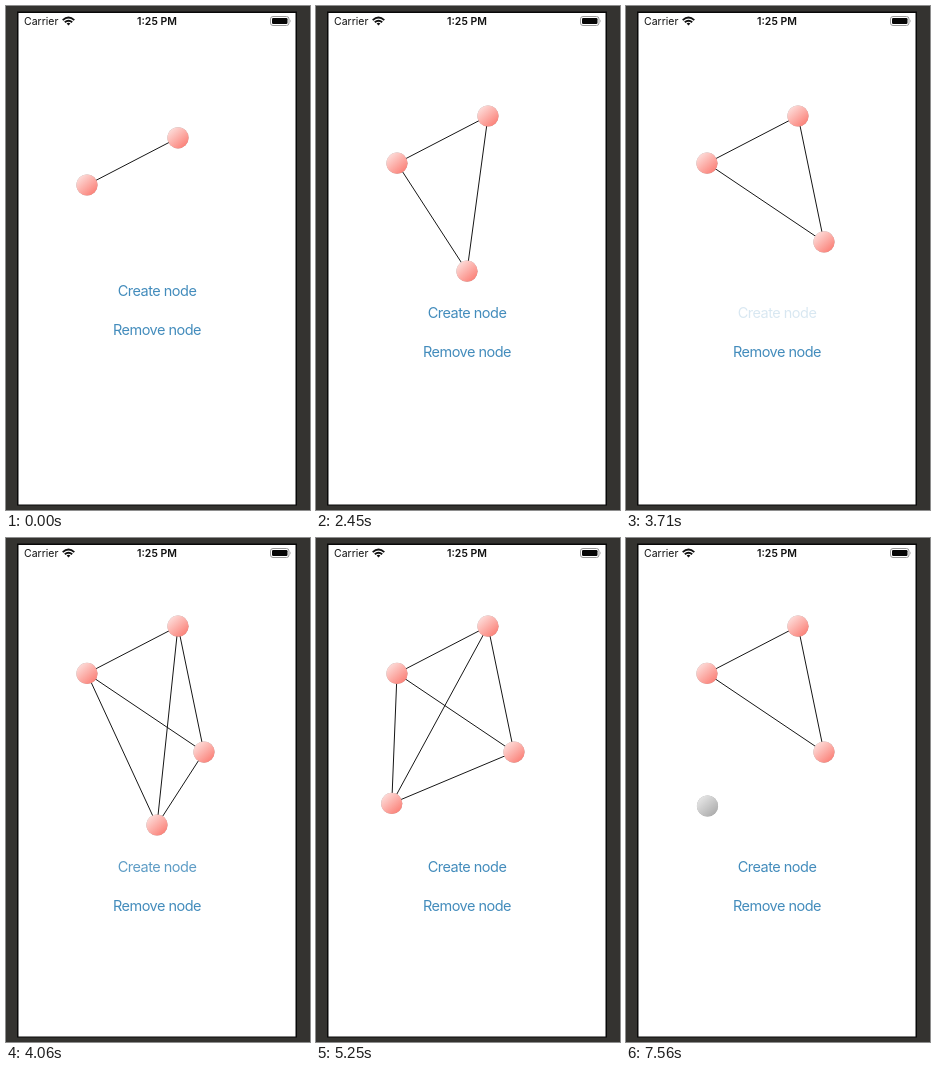
Write an HTML page that moves like this. It is 304 by 504 pixels and loops after 8 s.

```html
<!DOCTYPE html>
<html lang="en">
<head>
<meta charset="utf-8">
<title>Node graph</title>
<style>
  html, body { margin: 0; width: 100%; height: 100%; overflow: hidden; background: #343330; }
  svg { display: block; width: 100%; height: 100%; }
  text { font: 10.5px Inter, sans-serif; fill: #111; }
  .time { font-weight: 600; text-anchor: middle; }
  .button { font-size: 14.5px; letter-spacing: -.035em; fill: #438cbc; text-anchor: middle; }
  line { stroke: #161616; stroke-width: 1; }
  .node { filter: drop-shadow(.5px .8px .7px #0005); }
</style>
</head>
<body>
<svg viewBox="0 0 304 504">
  <defs>
    <linearGradient id="pink" x1=".15" y1=".1" x2=".85" y2=".9">
      <stop stop-color="#fddcd9"/><stop offset="1" stop-color="#fb8077"/>
    </linearGradient>
    <linearGradient id="gray" x1=".15" y1=".1" x2=".85" y2=".9">
      <stop stop-color="#e6e6e6"/><stop offset="1" stop-color="#acacac"/>
    </linearGradient>
  </defs>
  <rect width="304" height="504" fill="#343330"/>
  <rect x="11" y="5.5" width="280" height="494" fill="#080808"/>
  <rect x="12.5" y="7" width="277" height="491.5" fill="#fff"/>
  <text x="18" y="19">Carrier</text>
  <g fill="none" stroke="#111" stroke-width="1.9">
    <path d="M56.7 14.1Q62.5 8.9 68.3 14.1M58.8 16.3Q62.5 13 66.2 16.3"/>
    <path d="M60.6 17.4Q62.5 16 64.4 17.4L62.5 19.5Z" fill="#111" stroke="none"/>
  </g>
  <text class="time" x="151" y="19">1:25 PM</text>
  <rect x="264.5" y="10.5" width="18.5" height="9" rx="2.5" fill="#fff" stroke="#999"/>
  <rect x="266" y="12" width="15.5" height="6" rx="1.2" fill="#050505"/>
  <path d="M284.2 13.5q1.4 1.5 0 3z" fill="#999"/>
  <g id="edges"></g>
  <g id="nodes"></g>
  <g id="buttons">
    <text id="create" class="button" x="151" y="290">Create node</text>
    <text class="button" x="151" y="329.3">Remove node</text>
  </g>
</svg>
<script>
const LOOP = 8000;
const DIM = 0.2, FADE = 490;
const PRESSES = [{ down: 1680, up: 1750 }, { down: 3710, up: 3780 }];
const DESELECT = 7000;
const ROW = 21.8;

// Each track lists [time, x, y] in content coordinates; the content moves up when a node is added.
const TRACKS = [
  [[0, 81, 179]],
  [[0, 172, 131.8]],
  [[PRESSES[0].up, 151, 287], [2830, 151, 287], [3430, 198, 257.7]],
  [[PRESSES[1].up, 151, 330.6], [4790, 151, 330.6], [5230, 75.7, 309], [5600, 81.5, 311.6]]
];

const byId = id => document.getElementById(id);
const add = (parent, tag, attrs = {}) => {
  const el = document.createElementNS('http://www.w3.org/2000/svg', tag);
  setAttrs(el, attrs);
  return parent.appendChild(el);
};
function setAttrs(el, attrs) {
  for (const key in attrs) el.setAttribute(key, attrs[key]);
}
const show = (el, visible) => el.style.display = visible ? '' : 'none';
const smooth = p => p * p * (3 - 2 * p);

const nodes = TRACKS.map(() => add(byId('nodes'), 'circle', { class: 'node', r: 10.6 }));
const edges = [];
for (let b = 1; b < TRACKS.length; b++)
  for (let a = 0; a < b; a++) edges.push({ a, b, el: add(byId('edges'), 'line') });

function position(track, t) {
  const next = track.findIndex(key => key[0] > t);
  if (next < 1) return track.at(next).slice(1);
  const [t0, x0, y0] = track[next - 1], [t1, x1, y1] = track[next];
  const p = smooth((t - t0) / (t1 - t0));
  return [x0 + (x1 - x0) * p, y0 + (y1 - y0) * p];
}

function createOpacity(t) {
  const press = PRESSES.findLast(({ down }) => t >= down);
  if (!press) return 1;
  if (t < press.up) return DIM;
  const left = 1 - Math.min(1, (t - press.up) / FADE);
  return 1 - (1 - DIM) * left * left;
}

function render(t) {
  const shift = ROW * PRESSES.filter(({ up }) => t >= up).length;
  const points = TRACKS.map(track => position(track, t));
  const exists = TRACKS.map(track => t >= track[0][0]);
  const detached = t >= DESELECT;

  nodes.forEach((el, i) => {
    const [cx, y] = points[i];
    setAttrs(el, { cx, cy: y - shift, fill: detached && i === 3 ? 'url(#gray)' : 'url(#pink)' });
    show(el, exists[i]);
  });
  for (const { a, b, el } of edges) {
    const [x1, y1] = points[a], [x2, y2] = points[b];
    setAttrs(el, { x1, y1: y1 - shift, x2, y2: y2 - shift });
    show(el, exists[b] && !(detached && b === 3));
  }
  byId('buttons').setAttribute('transform', `translate(0 ${shift})`);
  byId('create').setAttribute('opacity', createOpacity(t));
}

const start = performance.now();
function tick() {
  render((performance.now() - start) % LOOP);
  requestAnimationFrame(tick);
}
tick();
</script>
</body>
</html>
```
